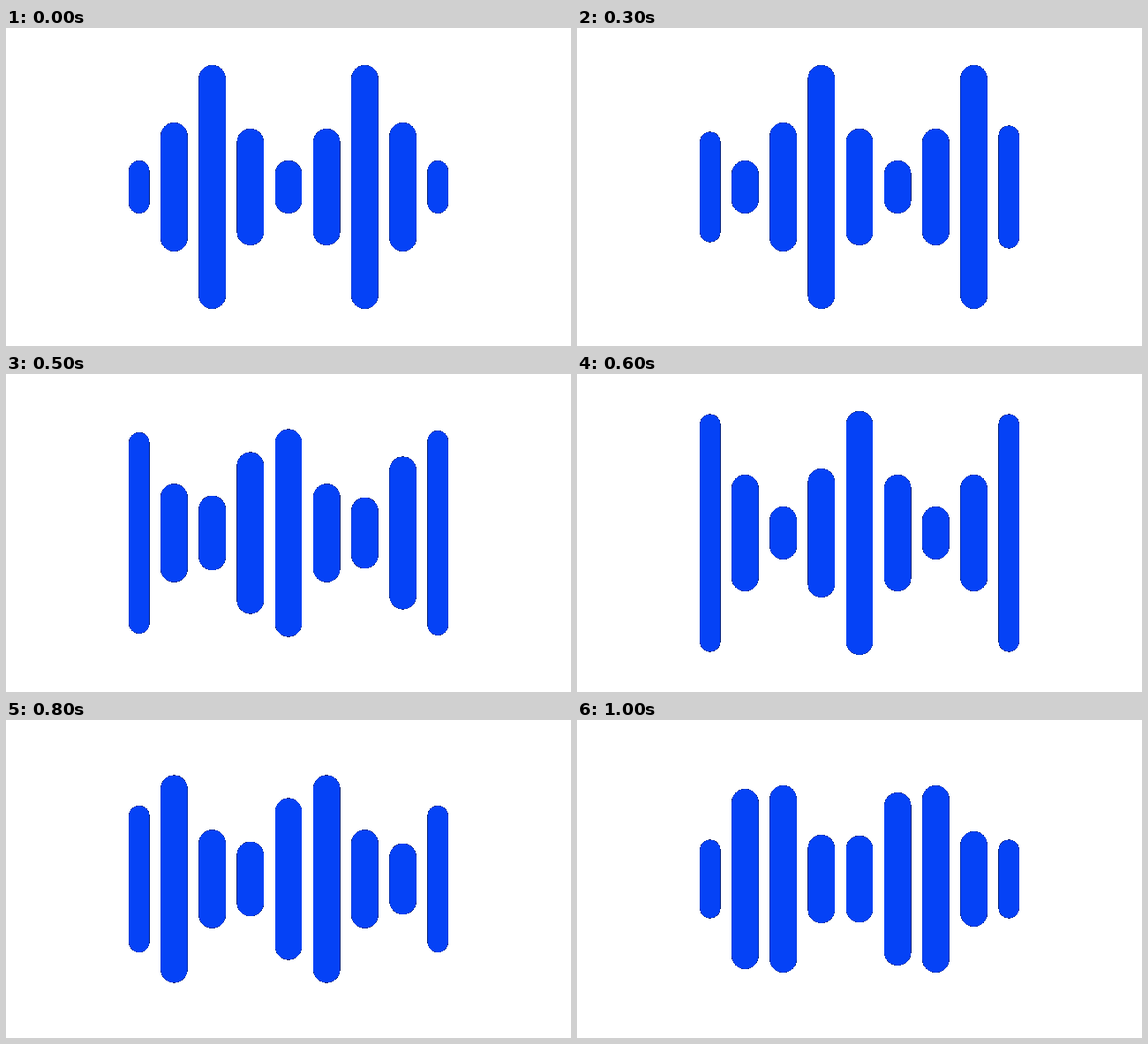
An HTML page with a canvas for the animation above (1.1 s loop, 640 by 360 pixels).

```html
<!DOCTYPE html>
<html lang="en">
<head>
<meta charset="utf-8">
<title>Sound bars</title>
<style>
  html, body { margin: 0; width: 100%; height: 100%; overflow: hidden; background: #fff; }
  canvas { display: block; width: 640px; height: 360px; }
</style>
</head>
<body>
<canvas id="stage" width="640" height="360"></canvas>
<script>
  const CX = 320, CY = 180, LAST = 8;
  const BLUE = [5, 66, 246];
  const GAP = 43.2, WIDTH = 30.6;
  const EDGE_X = 169.2, EDGE_WIDTH = 23.4, EDGE_TRIM = 3.5;
  const LOW = 30, MID = 66, SHOULDER = 73, HIGH = 138;
  const STEP_MS = 100, STEPS = 11;
  const TICKS_PER_STEP = 2.4, BEAT = 7, LOOP = STEPS * TICKS_PER_STEP;
  const MIN_ALPHA = 90;

  const canvas = document.getElementById("stage");
  const ctx = canvas.getContext("2d", { willReadFrequently: true });

  const isEdge = i => i === 0 || i === LAST;

  // The wave moves one bar to the right on each beat and repeats every four bars
  function halfAt(i, beat) {
    const place = i - beat % 4;
    const phase = (place + 4) % 4;
    if (phase === 0) return LOW;
    const side = Math.abs(place - 4) === 3 ? SHOULDER : MID;
    return (phase === 2 ? HIGH : side) - (isEdge(i) ? EDGE_TRIM : 0);
  }

  function drawBar(i, half) {
    const edge = isEdge(i);
    const width = edge ? EDGE_WIDTH : WIDTH;
    const mid = CX + (edge ? Math.sign(i - 4) * EDGE_X : (i - 4) * GAP);
    ctx.beginPath();
    ctx.roundRect(mid - width / 2, CY - half, width, half * 2, width / 2);
    ctx.fill();
  }

  // Turn soft edge pixels into a hard, dark rim
  function hardenEdges() {
    const image = ctx.getImageData(0, 0, canvas.width, canvas.height);
    const px = image.data;
    for (let p = 0; p < px.length; p += 4) {
      const alpha = px[p + 3];
      const solid = alpha >= MIN_ALPHA;
      BLUE.forEach((c, n) => { px[p + n] = c * alpha / 255; });
      px[p + 3] = solid ? 255 : 0;
    }
    ctx.putImageData(image, 0, 0);
  }

  function draw(step) {
    const time = Math.floor(step * TICKS_PER_STEP);
    const beat = Math.floor(time / BEAT);
    const from = beat * BEAT;
    // The last beat is cut short by the end of the loop
    const mix = (time - from) / (Math.min(from + BEAT, LOOP) - from);

    ctx.clearRect(0, 0, canvas.width, canvas.height);
    ctx.fillStyle = `rgb(${BLUE})`;
    for (let i = 0; i <= LAST; i++) {
      const a = halfAt(i, beat), b = halfAt(i, beat + 1);
      drawBar(i, a + (b - a) * mix);
    }
    hardenEdges();
  }

  const start = performance.now();
  let shown = -1;

  function tick() {
    const step = Math.floor((performance.now() - start) / STEP_MS) % STEPS;
    if (step !== shown) draw(shown = step);
    requestAnimationFrame(tick);
  }

  tick();
</script>
</body>
</html>
```
